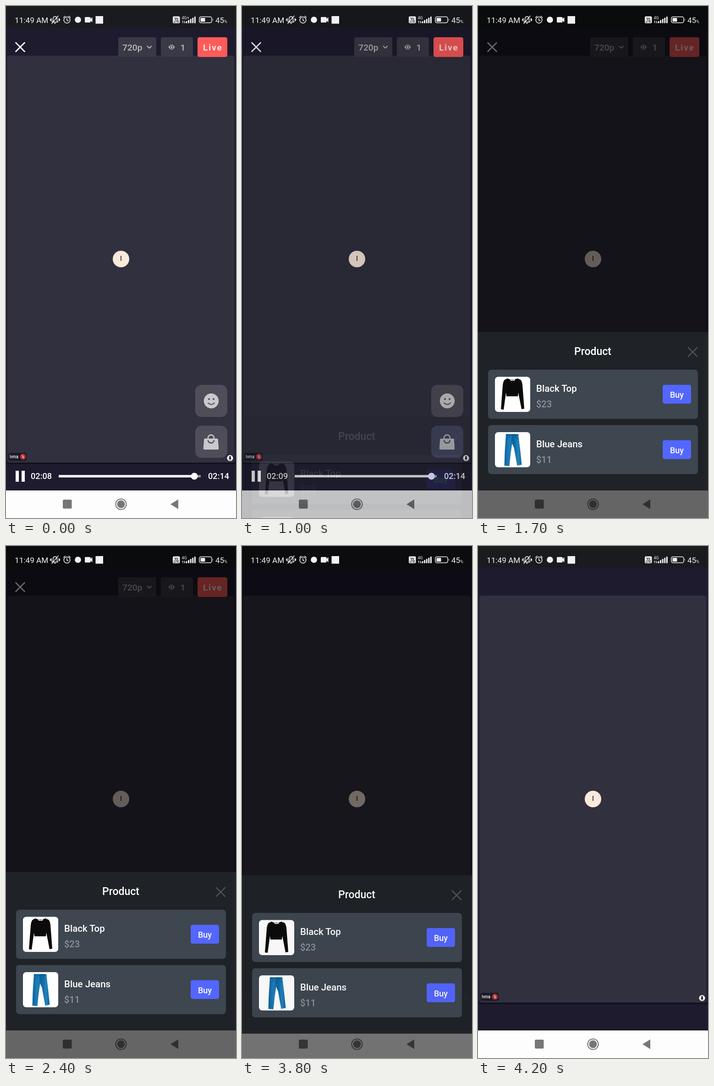
An HTML page for the animation above (4300 ms loop, 502 by 1115 pixels).

```html
<!DOCTYPE html>
<html lang="en">
<head>
<meta charset="utf-8">
<title>Live shopping</title>
<style>
html, body { margin: 0; width: 100%; height: 100%; overflow: hidden; background: #1e1b2e; }
svg { display: block; width: 502px; height: 1115px; font-family: Roboto, Arial, sans-serif; }
.m { font-weight: 500; }
.line { fill: none; stroke-linecap: round; stroke-linejoin: round; }
</style>
</head>
<body>
<svg viewBox="0 0 502 1115">
  <defs>
    <path id="cross" class="line" d="M-9.5-9.5 9.5 9.5M9.5-9.5-9.5 9.5"/>
    <linearGradient id="denim" x2="1">
      <stop offset="0" stop-color="#0d639d"/><stop offset=".3" stop-color="#207fbb"/>
      <stop offset=".55" stop-color="#0e649f"/><stop offset=".8" stop-color="#2384bd"/>
      <stop offset="1" stop-color="#0f6199"/>
    </linearGradient>
  </defs>

  <g id="base">
    <rect width="502" height="1115" fill="#1e1b2e"/>
    <rect width="502" height="47" fill="#1a1b1f"/>
    <rect x="2.5" y="108" width="496" height="886" rx="6" fill="#31303f"/>
    <rect y="995.5" width="502" height="1.5" fill="#0b0a12"/>
    <circle cx="251" cy="551" r="18" fill="#fbeada"/>
    <text x="251" y="555" font-size="14" text-anchor="middle" class="m" fill="#2b2438">I</text>
    <rect x="5" y="973" width="40" height="17.5" rx="4" fill="#1b1a25"/>
    <text x="8" y="985" font-size="10.3" class="m" fill="#f2f2f4">ivna</text>
    <circle cx="37" cy="981.5" r="6.5" fill="#b22a35"/>
    <path class="line" stroke="#ecd3d5" d="M37 978.5v3M34.8 981.5q2.200 3.500 4.400 0M37 983.500v1.500M34.500 978l5 7"/>
    <circle cx="489" cy="984.500" r="6.500" fill="#fff"/>
    <path d="M486.800 980.500h4.400v1l-.7.5v2.500l1.500 1.500v.8h-2.300v2.700h-1.400v-2.700h-2.300v-.8l1.500-1.500v-2.500l-.7-.5z" fill="#16151d"/>
    <rect y="1055" width="502" height="60" fill="#fdfdfe"/>
    <rect x="124" y="1075" width="19.500" height="19.500" rx="2.500" fill="#767676"/>
    <circle cx="251" cy="1085" r="11.600" fill="none" stroke="#767676" stroke-width="2"/>
    <circle cx="251" cy="1085" r="8.500" fill="#767676"/>
    <path d="M359 1085 376 1074.500V1095.500Z" fill="#767676"/>
  </g>

  <g id="controls">
    <use href="#cross" x="31" y="89.500" stroke="#fff" stroke-width="2.800"/>
    <g fill="#3a3946">
      <rect x="245" y="68" width="83" height="43" rx="4"/>
      <rect x="338" y="68" width="70" height="43" rx="4"/>
    </g>
    <g fill="#b9b9be" font-size="19.200" class="m">
      <text x="254" y="97">720p</text>
      <text x="380.500" y="97">1</text>
    </g>
    <path class="line" d="M308.500 87.500l4.300 4.300 4.300-4.300" stroke="#b9b9be" stroke-width="2"/>
    <path d="M354.500 89.500q7-10.500 14 0q-7 10.500-14 0z" fill="#b9b9be"/>
    <circle cx="361.500" cy="89.500" r="3" fill="#b9b9be" stroke="#3a3946" stroke-width="1.500"/>
    <rect x="418" y="68" width="65" height="43" rx="4.500" fill="#ff5a5a"/>
    <text x="430" y="97" font-size="19" font-weight="700" letter-spacing="1.900" fill="#ffe9e9">Live</text>

    <rect x="413" y="825" width="70" height="70" rx="14" fill="#4e4d59"/>
    <circle cx="448" cy="860" r="16.200" fill="#c9c9cd"/>
    <circle cx="443" cy="856" r="2.100" fill="#4e4d59"/>
    <circle cx="453" cy="856" r="2.100" fill="#4e4d59"/>
    <path class="line" d="M441 864.500q7 6.500 14 0" stroke="#4e4d59" stroke-width="2"/>
    <rect id="shop" x="413" y="914" width="70" height="70" rx="14" fill="#4e4d59"/>
    <path d="M434 942h27q1.500 0 1.700 1.500l1.500 20q0 2.500-2.500 2.500h-28.400q-2.500 0-2.500-2.500l1.500-20q.2-1.500 1.700-1.500z" fill="#c9c9cd"/>
    <path class="line" d="M441 943v-2.500a6.500 6.500 0 0 1 13 0v2.500" stroke="#c9c9cd" stroke-width="2.600"/>
    <path class="line" d="M441 946.500a6.700 6.700 0 0 0 13 0" stroke="#4e4d59" stroke-width="2.600"/>

    <path d="M21 1012h7v24h-7zM34 1012h7v24h-7z" fill="#fff"/>
    <g fill="#fff" font-size="18.200" class="m">
      <text id="clock" x="54" y="1030">02:08</text>
      <text x="441" y="1030">02:14</text>
    </g>
    <rect x="115" y="1021.500" width="310" height="5" fill="#98979f"/>
    <rect id="played" x="115" y="1021.500" width="296" height="5" fill="#fff"/>
    <circle id="thumb" cx="411" cy="1024" r="7.500" fill="#fff"/>
  </g>

  <rect id="dim" width="502" height="1115" fill="#000"/>

  <g id="sheet">
    <rect y="710" width="502" height="345" fill="#1f2226"/>
    <text x="250.500" y="760" font-size="23" text-anchor="middle" class="m" fill="#fff">Product</text>
    <use href="#cross" x="468.500" y="753.500" stroke="#4a505b" stroke-width="2.700"/>
    <g id="cards"></g>
    <g id="top">
      <path d="M64 811q11 5 22 0l7 3q3 3 4 11l4 52-6 1-7-36-1 8H62l-1-8-5 37-6-1 4-52q1-9 4-12z" fill="#0b0b0c"/>
      <path d="M70 812q5 4 11 0l-1 4h-9z" fill="#e7e4e2"/>
      <path d="M72 813.500h6" stroke="#4d4d50"/>
    </g>
    <g id="jeans">
      <path d="M61 932h27l4 34 3.500 33-10 2-7-39-4-9-3 20-3 29-11-1 1-32z" fill="url(#denim)"/>
      <path class="line" d="M61 935h27M75 935v12M62 943q6 0 7-7M88 943q-5 0-6-7" stroke="#0a4d80"/>
    </g>
  </g>

  <g id="status" fill="#f1f1f3">
    <text x="19" y="36.500" font-size="17.200">11:49 AM</text>
    <g class="line" stroke="#f1f1f3" stroke-width="1.600">
      <path d="M101 35h12l-1.600-2.500V28q0-4.500-4.400-5-4.400.5-4.400 5v4.500zM105.500 37.500h3M98.800 27v6M115.500 27v6M96.800 28.500v3M117.300 28.500v3"/>
      <path d="M100 38l14-16.500"/>
      <circle cx="133" cy="30.500" r="6.800"/>
      <path d="M133 27v4l2.500 1.500M125.500 25l3.500-3M140.500 25l-3.500-3"/>
    </g>
    <circle cx="157" cy="30" r="6.800"/>
    <path d="M173.500 24h9.500q1.500 0 1.500 1.500v2.500l4-3.500v11l-4-3.500v2.500q0 1.500-1.500 1.500h-9.500q-1.500 0-1.500-1.500v-9q0-1.500 1.500-1.500z"/>
    <rect x="195.500" y="22" width="16.500" height="16.500"/>
    <rect x="364" y="22.500" width="15.500" height="15" rx="2.500"/>
    <g font-size="7" font-weight="700" text-anchor="middle" fill="#17181c">
      <text x="371.700" y="29.500">Vo</text>
      <text x="371.700" y="36.300">LTE</text>
    </g>
    <text id="net" x="383.500" y="28.500" font-size="9">4G+</text>
    <path class="line" d="M386 37v-4.500m-1.200 1.300 1.200-1.300M389.500 32.500v4.500m1.200-1.300-1.200 1.300" stroke="#f1f1f3" stroke-width="1.100"/>
    <g id="bars"></g>
    <rect x="422" y="23.500" width="27" height="13" rx="3.500" fill="none" stroke="#f1f1f3" stroke-width="1.500"/>
    <rect x="424.500" y="26" width="10" height="8" rx="1"/>
    <path d="M451 27.500q2 2.500 0 5z"/>
    <text x="457" y="36.500" font-size="17">45</text>
    <text x="476" y="36.500" font-size="9.500">%</text>
  </g>
</svg>
<script>
const LOOP = 4300;
const $ = id => document.getElementById(id);

$("cards").innerHTML = [["Black Top", "$23", 0], ["Blue Jeans", "$11", 120.5]].map(([name, price, y]) => `
  <g transform="translate(0 ${y})" class="m">
    <rect x="22" y="792" width="458" height="107" rx="7" fill="#3e464f"/>
    <rect x="37" y="807.500" width="77" height="76.500" rx="7" fill="#fff"/>
    <text x="127" y="840" font-size="20.500" fill="#fff">${name}</text>
    <text x="127" y="874" font-size="20" fill="#8d929d">${price}</text>
    <rect x="403" y="825" width="62" height="41" rx="4.500" fill="#5366ff"/>
    <text x="434" y="853" font-size="18" text-anchor="middle" fill="#fff">Buy</text>
  </g>`).join("");

$("bars").innerHTML = [0, 1, 2, 3, 4].map(i => {
  const h = 4.5 + i * 2.5;
  return `<rect x="${392.5 + i * 4.6}" y="${37.5 - h}" width="3" height="${h}" rx="1"/>`;
}).join("");

// time, backdrop alpha, sheet alpha, sheet offset
const STEPS = [
  [0, 0, 0, 190],
  [900, .04, 0, 190],
  [1000, .16, .12, 185],
  [1100, .45, .56, 95],
  [1200, .6, 1, 0],
  [3800, .55, .97, 7],
  [3900, .45, .8, 38],
  [4000, .28, .45, 100],
  [4100, .1, .12, 190],
  [4200, 0, 0, 190]
];

function draw(t) {
  const [, dim, alpha, shift] = STEPS.findLast(s => s[0] <= t);
  $("dim").setAttribute("opacity", dim);
  $("sheet").setAttribute("opacity", alpha);
  $("sheet").setAttribute("transform", `translate(0 ${shift})`);
  $("controls").setAttribute("visibility", t < 3800 ? "visible" : "hidden");
  $("shop").setAttribute("fill", t < 800 ? "#4e4d59" : "#484a68");
  $("net").textContent = t < 700 ? "4G+" : "4G";

  const ticked = t >= 400;
  const x = ticked ? 413.5 : 411;
  $("clock").textContent = ticked ? "02:09" : "02:08";
  $("thumb").setAttribute("cx", x);
  $("played").setAttribute("width", x - 115);
}

const start = performance.now();
function frame() {
  draw((performance.now() - start) % LOOP);
  requestAnimationFrame(frame);
}
frame();
</script>
</body>
</html>
```
